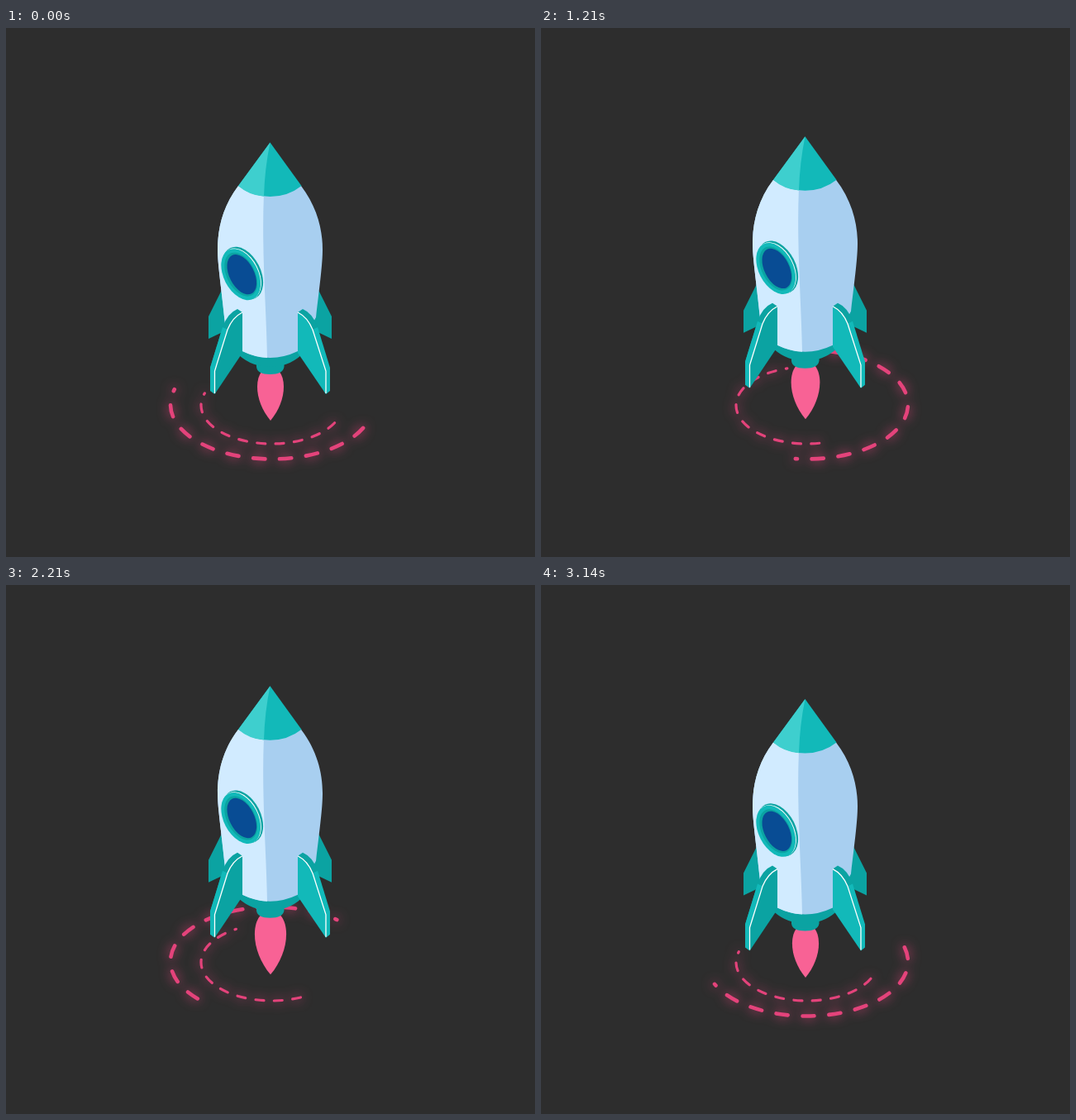
These frames come from a looping animation (640x640 px, 3.21 s). An HTML page:

```html
<!DOCTYPE html>
<html lang="en">
<head>
<meta charset="utf-8">
<title>Rocket</title>
<style>
  html, body { margin: 0; width: 100%; height: 100%; overflow: hidden; background: #2d2d2d; }
  svg { display: block; width: 100%; height: 100%; }
  #rings { fill: none; stroke: #e4437b; stroke-linecap: round; filter: drop-shadow(0 0 7px #e4437b); }
  .bright { fill: #12b9b9; }
  .dark { fill: #0ba3a2; }
  .edge { fill: none; stroke: #fff; stroke-width: 1.3; }
</style>
</head>
<body>
<svg viewBox="0 0 640 640">
  <g id="rings">
    <ellipse id="outer" cx="321.5" cy="455.5" rx="122.5" ry="66" stroke-width="4.6"/>
    <ellipse id="inner" cx="321.5" cy="456.5" rx="85.5" ry="46.5" stroke-width="3.2"/>
  </g>
  <g id="rocket">
    <path id="flame" fill="#f86295" d="M320 475C310 463 304 448 304 434C304 418 312 410 320 410C328 410 336 418 336 434C336 448 330 463 320 475Z"/>
    <path class="dark" d="M303 403V410Q304 419 319.5 419Q335 419 336.5 410V403Z"/>
    <path class="dark" d="M282 388V396Q298 410 319.5 410Q341 410 357 396V388Z"/>
    <path class="dark" d="M262 315L245 349V376L270 364ZM377 315L394 349V376L369 364Z"/>

    <path fill="#a8cff0" d="M281 191C262 216 256 243 256 268C256 285 260 310 265 358L286 391Q319.5 407 353 391L375 350C380 308 383 285 383 268C383 243 376 216 357 191Z"/>
    <path fill="#d1ebff" d="M281 191C262 216 256 243 256 268C256 285 260 310 265 358L286 391Q300 398 316 399C315 340 309 270 312 200Z"/>
    <path class="bright" d="M319.5 138.5L281 191Q298 204 319.5 204Q341 204 357.5 191Z"/>
    <path fill="#3ecfce" d="M319.5 138.5L281 191Q294 202.5 312 203.7Q313 170 319.5 138.5Z"/>

    <g transform="translate(286.5 296.5) rotate(63)">
      <ellipse class="dark" rx="34" ry="21.5"/>
    </g>
    <g transform="translate(285 297.6) rotate(63)">
      <ellipse fill="#fff" rx="33.2" ry="20.8"/>
    </g>
    <g transform="translate(284.2 298.2) rotate(63)">
      <ellipse class="bright" rx="33.2" ry="20.8"/>
      <ellipse class="dark" rx="28.5" ry="17"/>
    </g>
    <g transform="translate(285.3 298.2) rotate(63)">
      <ellipse fill="#084c94" rx="26" ry="15"/>
    </g>

    <path class="dark" d="M286 344L280 340Q268 345 262 362L247 411V415H252.5L268 365Q274 350 286 344Z"/>
    <path class="bright" d="M262 362L247 411V439L252.5 443V415L268 365Z"/>
    <path class="dark" d="M286 344V393L252.5 443V415L268 365Q274 350 286 344Z"/>
    <path class="edge" d="M286 344Q274 350 268 365L252.5 415V442"/>

    <path class="dark" d="M353 344L359 340Q371 345 377 362L371 365Q365 350 353 344Z"/>
    <path class="bright" d="M377 362L392 411V439L387 443L371 365Z"/>
    <path class="bright" d="M353 344V393L387 443V415L371 365Q365 350 353 344Z"/>
    <path class="edge" d="M353 344Q365 350 371 365L387 415V442"/>
  </g>
</svg>
<script>
  const LOOP = 3210, STEP = LOOP / 45;
  const BOB_PERIOD = 1540, BOB_HEIGHT = 16.8;
  const byId = id => document.getElementById(id);
  const rocket = byId('rocket'), flame = byId('flame');

  // Nine dashes and a short leading one; the rest of the ring stays empty.
  function makeRing(id, scale, start, period) {
    const ring = byId(id), length = ring.getTotalLength();
    const dash = 14.2 * scale, gap = 17.8 * scale, tip = 2.2 * scale;
    const used = 9 * (dash + gap) + tip;
    ring.setAttribute('stroke-dasharray',
      [...Array(9).fill([dash, gap]).flat(), tip, length - used].join(' '));
    return time => ring.setAttribute('stroke-dashoffset',
      -((start + length * time / period) % length));
  }

  const rings = [makeRing('outer', 1, 31.5, 1636), makeRing('inner', 0.7, 24, 1048)];

  function draw(time) {
    // Slightly flatter at the top of the bob than at the bottom.
    const lift = ((1 - Math.cos(2 * Math.PI * time / BOB_PERIOD)) / 2) ** 0.88;
    rocket.setAttribute('transform', `translate(0 ${-BOB_HEIGHT * lift})`);
    flame.setAttribute('transform',
      `translate(320 410) scale(${1 + 0.2 * lift}) translate(-320 -410)`);
    rings.forEach(turn => turn(time));
  }

  const origin = performance.now();
  function tick() {
    const elapsed = (performance.now() - origin) % LOOP;
    draw(Math.min(44, Math.floor((elapsed + 4) / STEP)) * STEP);
    requestAnimationFrame(tick);
  }
  tick();
</script>
</body>
</html>
```
